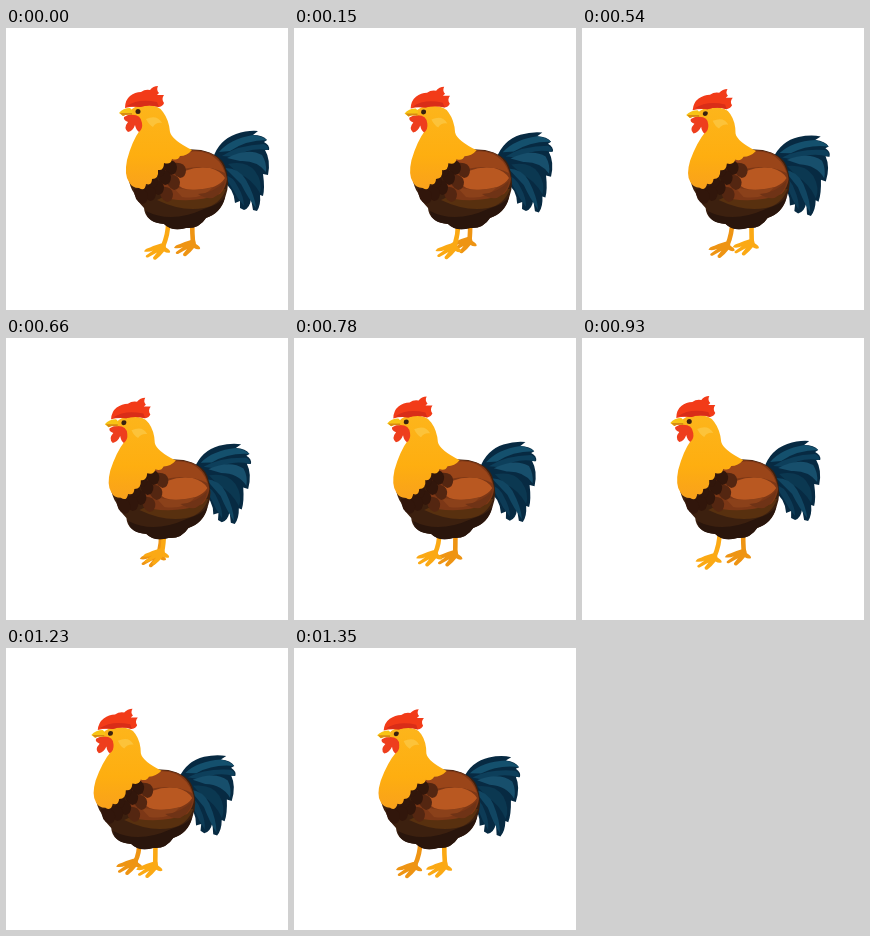
An HTML page for the animation above (1.85 s loop, 282x282 px).

```html
<!DOCTYPE html>
<html lang="en">
<head>
<meta charset="utf-8">
<title>Walking rooster</title>
<style>
  html, body { margin: 0; width: 100%; height: 100%; overflow: hidden; background: #fff; }
  svg { display: block; width: 100%; height: 100%; }
  .shin { fill: none; stroke-width: 4.6; stroke-linecap: round; }
  .near { stroke: #fba914; fill: #fba914; }
  .far { stroke: #ee9413; fill: #ee9413; }
  .foot { stroke: none; }
</style>
</head>
<body>
<svg viewBox="0 0 282 282">
  <defs>
    <linearGradient id="gold" x1="0" y1="0" x2="0" y2="1">
      <stop offset="0" stop-color="#fdb51b"/>
      <stop offset=".6" stop-color="#feae10"/>
      <stop offset="1" stop-color="#f9a11b"/>
    </linearGradient>
    <path id="toes" d="M-2-3Q-9-1-13 1Q-18 2-19 5Q-14 6-10 4L-17 9Q-18 11-15 11L-6 6L-10 11Q-10 14-7 13Q-2 9 1 5Q4 7 7 6Q8 4 3 1L2-3Z"/>
    <path id="scale" d="M-6-6Q7-8 8 1Q8 8 2 9Q-6 6-6-6Z"/>
  </defs>

  <g id="bird">
    <g id="tail">
      <path fill="#072a42" d="M207 130Q213 112 230 106Q242 102 252 103L247 107Q257 107 261 112L258 114Q264 117 263 122L259 122Q265 132 262 147L257 146Q259 160 257 168L254 167Q255 177 251 183L247 182L245 171Q244 180 238 182L234 180L234 173L229 175Q228 160 216 153Z"/>
      <path fill="#14506d" d="M213 124Q224 111 247 107Q256 108 261 112Q240 112 224 123Z"/>
      <path fill="#0d3f5b" d="M216 128Q232 117 258 116Q263 118 262 122Q243 119 230 129Z"/>
      <path fill="#174f6c" d="M221 130Q242 119 256 127Q261 135 260 144Q251 132 234 133Z"/>
      <path fill="#0b3851" d="M222 136Q240 132 249 143Q257 154 254 165Q246 151 232 145Z"/>
      <path fill="#114662" d="M219 140Q233 140 240 152Q249 168 250 180Q242 170 235 156Z"/>
      <path fill="#0d3b56" d="M218 147Q227 148 232 159Q238 169 238 178Q231 170 226 160Z"/>
    </g>

    <g id="farLeg" class="far"><path class="shin"/><use class="foot" href="#toes"/></g>
    <g id="nearLeg" class="near"><path class="shin"/><use class="foot" href="#toes"/></g>

    <path fill="#3c200f" d="M122 148Q124 160 128 165Q131 173 138 180Q139 194 158 196Q166 204 180 200Q193 201 200 190Q215 185 219 170Q225 155 219 138Q214 126 195 122L165 120L134 132Z"/>
    <path fill="#29150c" d="M140 183Q165 196 198 181Q214 176 219 169Q215 185 200 190Q193 201 180 200Q166 204 158 196Q141 195 140 183Z"/>
    <path fill="#58300f" d="M151 172Q172 160 220 161Q214 177 198 180Q176 184 151 172Z"/>
    <path fill="#7c3716" d="M158 134Q178 116 204 125Q218 131 221 151Q220 160 214 166Q190 175 164 171Q149 164 158 134Z"/>
    <path fill="#9a4519" d="M163 134Q182 118 203 126Q215 132 219 145Q196 133 163 145Z"/>
    <path fill="#b95821" d="M166 152Q181 137 204 140Q215 143 219 150Q212 161 191 162Q175 163 166 152Z"/>
    <path fill="#8b411a" d="M166 158Q183 165 207 159Q196 172 176 169Z"/>
    <path fill="#6f3316" d="M192 166Q208 165 219 153Q217 165 207 170Q199 171 192 166Z"/>

    <g fill="#542611">
      <use href="#scale" x="172" y="141"/>
      <use href="#scale" x="166" y="153"/>
      <use href="#scale" x="159" y="165"/>
    </g>
    <g fill="#31160b">
      <use href="#scale" x="163" y="138"/>
      <use href="#scale" x="157" y="148"/>
      <use href="#scale" x="150" y="158"/>
      <use href="#scale" x="142" y="164"/>
      <use href="#scale" x="134" y="167"/>
      <use href="#scale" x="151" y="140"/>
      <use href="#scale" x="144" y="151"/>
    </g>

    <g id="neck">
      <path fill="url(#gold)" d="M124 84Q127 77 140 77Q153 77 157 84Q163 92 164 104Q166 112 186 122Q181 128 174 128Q172 133 166 131Q165 137 158 135Q158 143 152 142Q153 151 146 151Q146 158 140 156Q139 164 133 160Q126 160 123 154Q118 147 121 132Q126 113 134 102Q134 96 125 89Z"/>
      <path fill="#fcc33a" d="M140 91Q151 86 156 95Q150 94 147 99Q143 97 140 91Z"/>
      <path fill="#ee3e1d" d="M122 87Q135 85 136 95Q137 101 133 104Q130 102 129 97Q127 103 122 104Q117 100 122 94Q117 92 118 89Z"/>
      <path fill="#f8c414" d="M113 85Q117 80 124 80Q128 83 126 87Q120 86 117 88Z"/>
      <path fill="#d98b12" d="M114 85L126 85L126 87Q120 86 117 88Z"/>
      <path fill="#f23b18" d="M119 80Q119 72 124 68Q129 64 135 64Q139 61 144 62Q147 58 152 58Q150 62 153 65L151 67L158 67Q155 71 158 75Q157 78 153 79Q143 76 134 79Q126 78 119 80Z"/>
      <path fill="#d92d18" d="M121 78Q132 70 151 74L153 79Q143 76 134 79Q126 78 121 78Z"/>
      <circle cx="132" cy="83.5" r="2.5" fill="#3a2110"/>
    </g>
  </g>
</svg>
<script>
  const LOOP = 1850, WALK = 1350, STEP = 30, CYCLE = 900, DRIFT = 36;
  const $ = id => document.getElementById(id);
  const bird = $('bird'), tail = $('tail'), neck = $('neck');
  const move = (el, value) => el.setAttribute('transform', value);

  function pose(leg, phase, ground) {
    const x = 172 - 15 * Math.cos(phase);
    const y = ground + Math.cos(phase) + 4 * Math.min(0, Math.sin(phase));
    const hip = 175 + 0.8 * (x - 173);
    const [shin, foot] = leg.children;
    shin.setAttribute('d', `M${hip} 194Q${hip} 206 ${x} ${y}`);
    move(foot, `translate(${x} ${y})`);
  }

  function draw(now) {
    const t = Math.min(WALK, Math.floor((now % LOOP) / STEP) * STEP);
    const phase = 2 * Math.PI * t / CYCLE;
    const bob = (1 - Math.cos(phase)) / 2;
    const lean = 0.095 * bob, dip = 0.035 * bob;

    move(bird, `translate(${-DRIFT * t / WALK} 0)`);
    move(tail, `translate(${-3 * bob} ${bob}) rotate(${7 * bob} 212 140)`);
    // Shear the neck about the breast so the head travels most.
    move(neck, `matrix(1 0 ${-lean} ${1 - dip} ${150 * lean} ${150 * dip})`);
    pose($('nearLeg'), phase, 217.5);
    pose($('farLeg'), phase + Math.PI, 216);
  }

  const start = performance.now();
  function tick() {
    draw(performance.now() - start);
    requestAnimationFrame(tick);
  }
  tick();
</script>
</body>
</html>
```
